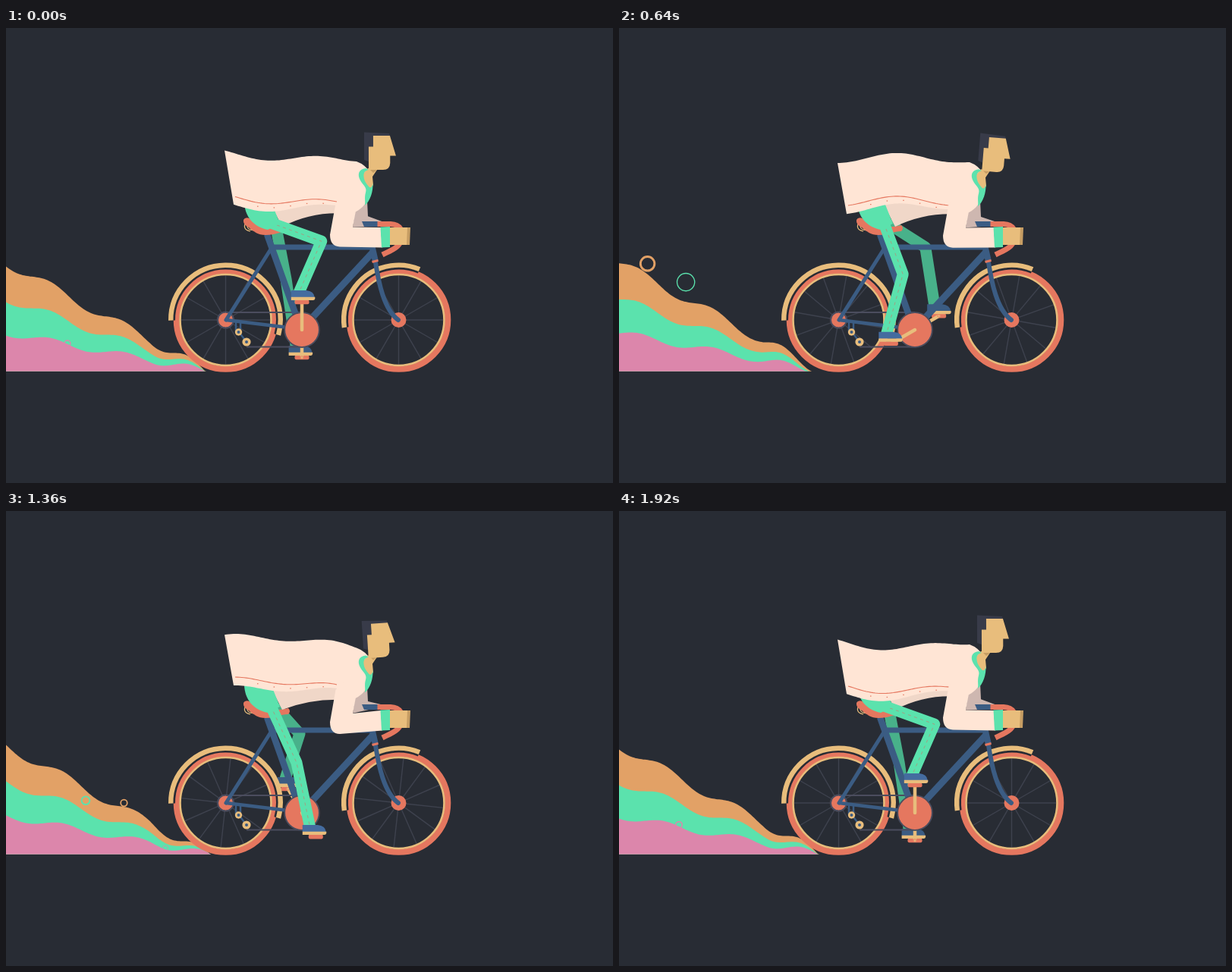
An HTML page with a canvas that plays this animation: 800 by 600 pixels, repeating every 1.96 s.

```html
<!DOCTYPE html>
<html lang="en">
<head>
<meta charset="utf-8">
<title>Cyclist</title>
<style>
html, body { margin: 0; width: 100%; height: 100%; overflow: hidden; background: #282c34; }
canvas { display: block; width: 800px; height: 600px; }
</style>
</head>
<body>
<canvas id="stage" width="800" height="600"></canvas>
<script>
const ctx = document.getElementById('stage').getContext('2d');
const TAU = Math.PI * 2, RAD = Math.PI / 180;
const LOOP = 1960, STEP = 40, TURN = 960, BEAT = 480, CYCLE = 1920;
const C = {
  bg: '#282c34', red: '#e5775f', gold: '#e8bd7c', goldDark: '#c69d63',
  blue: '#3b5c83', shoe: '#446c9f', green: '#5be2ad', greenDark: '#48b18a',
  orange: '#e2a166', pink: '#dc86ab', shirt: '#ffe5d5', lining: '#f0d7c8',
  sleeve: '#ceb7b0', hair: '#383b49', chain: '#4b4d5e', spoke: '#3e424e'
};
const REAR = 289.5, FRONT = 517.5, AXLE = 385, FLOOR = 452.7;
const CRANK = { x: 390, y: 398, len: 36.5 };

function fill(d, color) {
  ctx.fillStyle = color;
  ctx.fill(new Path2D(d));
}
function stroke(d, color, width, cap = 'butt', dash = []) {
  ctx.strokeStyle = color;
  ctx.lineWidth = width;
  ctx.lineCap = cap;
  ctx.lineJoin = 'round';
  ctx.setLineDash(dash);
  ctx.stroke(new Path2D(d));
  ctx.setLineDash([]);
}
function disc(x, y, r, color) {
  ctx.fillStyle = color;
  ctx.beginPath();
  ctx.arc(x, y, r, 0, TAU);
  ctx.fill();
}
function ring(x, y, r, color, width, from = 0, to = TAU) {
  ctx.strokeStyle = color;
  ctx.lineWidth = width;
  ctx.lineCap = 'butt';
  ctx.beginPath();
  ctx.arc(x, y, r, from, to);
  ctx.stroke();
}
function trace(f, from, to, step) {
  const pts = [];
  const n = Math.round(Math.abs(to - from) / step);
  for (let i = 0; i <= n; i++) {
    const x = from + (to - from) * i / n;
    pts.push(x.toFixed(1) + ',' + f(x).toFixed(2));
  }
  return pts.join(' L');
}

// ---- trailing waves ----
const LAYERS = [
  { color: C.orange, y: 309.3, slope: 0.54, amp: 6.5 },
  { color: C.green, y: 357.2, slope: 0.36, amp: 5.5 },
  { color: C.pink, y: 402, slope: 0.19, amp: 4.5 }
];
function waves(t) {
  const start = 180 - 97 * (t % BEAT) / BEAT;
  let above = () => 0;
  for (const { color, y, slope, amp } of LAYERS) {
    const over = above;
    const edge = x => {
      const warped = x + Math.max(0, x - 190) * 0.25;
      const s = Math.sin(TAU * (warped - start) / 97);
      return Math.min(FLOOR, Math.max(over(x), y + slope * x + amp * s));
    };
    fill(`M0,${FLOOR} L${trace(edge, 0, 290, 2)} L290,${FLOOR} Z`, color);
    above = edge;
  }
}

// start, life, x, y, r at birth, their speeds per ms, widest line
const BUBBLES = [
  [C.orange, 150, 850, 59, 350, 0.1, -0.0437, -0.08, 0.0187, 3],
  [C.orange, 950, 900, 168.8, 409.6, 0.7, -0.0325, -0.06, 0.00875, 1.8],
  [C.green, 120, 600, 111, 397, 3.5, -0.044, -0.119, 0.0156, 3.3],
  [C.green, 1240, 600, 110.3, 396, 3.5, -0.044, -0.119, 0.0156, 3.3],
  [C.pink, -200, 740, 91, 426.6, 2.6, -0.05, -0.053, 0.0068, 1.8],
  [C.pink, 1680, 740, 91, 426.6, 2.6, -0.05, -0.053, 0.0068, 1.8],
  [C.pink, 1300, 560, 213, 448, 3.2, -0.05, -0.053, 0.0068, 1.9]
];
function bubbles(t) {
  for (const [color, start, life, x, y, r, vx, vy, vr, w] of BUBBLES) {
    const age = t - start;
    if (age <= 0 || age >= life) continue;
    ring(x + vx * age, y + vy * age, r + vr * age, color, w * Math.sin(Math.PI * age / life));
  }
}

// ---- bicycle ----
function wheel(x, t) {
  const turn = 390 * RAD * t / CYCLE;
  for (let i = 0; i < 12; i++) {
    const a = turn + i * TAU / 12, c = Math.cos(a), s = Math.sin(a);
    stroke(`M${x + 9 * c},${AXLE + 9 * s} L${x + 59 * c},${AXLE + 59 * s}`, C.spoke, 1.4);
  }
  ring(x, AXLE, 64.8, C.red, 8);
  ring(x, AXLE, 60, C.gold, 2.6);
  disc(x, AXLE, 10, C.red);
}
function fender(x, from, to) {
  ring(x, AXLE, 67.9, C.bg, 2.8, from * RAD, to * RAD);
  ring(x, AXLE, 72.3, C.gold, 6.4, from * RAD, to * RAD);
}
function drivetrain() {
  ring(REAR, AXLE, 10.5, C.chain, 2);
  stroke('M290,375 H390 M317,420.5 H392', C.chain, 2);
  stroke('M303,387 V400 M309,389 V398 M307,401 L317,414', C.blue, 2.5);
  for (const [x, y, r] of [[306.5, 401, 4.7], [317, 414, 5.6]]) {
    disc(x, y, r, C.gold);
    disc(x, y, 2, C.blue);
  }
}
function frame() {
  stroke('M350,290 L290,385', C.blue, 5, 'round');
  stroke('M290,385 L372,395', C.blue, 4.5, 'round');
  stroke('M344,272 L384,384', C.blue, 8.5);
  stroke('M350,289 H484', C.blue, 7);
  stroke('M485,294 L398,388', C.blue, 9);
  stroke('M482,286 L487,308', C.blue, 8);
  stroke('M486.5,306 C491,336 498,371 517,385', C.blue, 6, 'round');
  stroke('M482.5,308.5 L490.5,306.5', C.red, 3);
}
function saddle() {
  stroke('M316,256 Q311,266 322,268 M319,257 Q315,266 327,267 M323,259 Q319,266 331,268', C.gold, 1.2);
  fill('M313,253 Q315,249 321,251 C327,257 335,261 345,262 C355,263 364,262 372,260 Q376,264 372,268 C362,268 356,273 342,273 C332,273 326,268 320,263 Q312,259 313,253 Z', C.red);
}
function handlebar() {
  stroke('M489,258.5 H507 C520,259 524,268 521,279 C518,290 508,293 496,299', C.red, 7);
  fill('M469,255 H489.5 V262 H472 Z', C.blue);
}

// ---- legs ----
function pose(a, far) {
  const px = CRANK.x + CRANK.len * Math.sin(a);
  const py = CRANK.y - CRANK.len * Math.cos(a);
  const heel = px - 15.8 + 1.7 * Math.cos(a + 20 * RAD);
  const kneeX = 395 + 24 * Math.cos(a - 30 * RAD);
  const kneeY = 308.5 - 28 * Math.cos(a - 12 * RAD) - 3 * Math.sin(2 * a);
  return {
    px, py, heel,
    hip: far ? [355, 258] : [349, 257],
    knee: far
      ? [kneeX - 12 - 8 * Math.cos(a + 30 * RAD), kneeY + 4 * Math.cos(a)]
      : [kneeX, kneeY],
    ankle: [heel + 10, py - 12]
  };
}
function leg(p, far) {
  const [kx, ky] = p.knee, [ax, ay] = p.ankle;
  const line = `M${p.hip} L${kx},${ky} L${ax},${ay}`;
  ctx.fillStyle = C.red;
  ctx.beginPath();
  ctx.roundRect(p.px - 9.5, p.py - 3, 19, 5.8, 2);
  ctx.fill();
  stroke(line, far ? C.greenDark : C.green, 15);
  if (!far) stroke(line, '#a0a083', 1, 'butt', [4, 4.5]);
  const x = p.heel, y = p.py - 15.5;
  fill(`M${x},${y} H${x + 20} Q${x + 30},${y + 1} ${x + 31},${y + 9} H${x} Z`, far ? C.blue : C.shoe);
  fill(`M${x},${y + 8.7} H${x + 31.5} V${y + 11} Q${x + 31},${y + 13} ${x + 29},${y + 13} H${x} Z`, C.gold);
}
function crankArm(p) {
  stroke(`M${CRANK.x},${CRANK.y} L${p.px},${p.py}`, C.gold, 4.5, 'round');
}

// ---- rider ----
// shirt-back sway: time, height at the tail, height at the middle
const SWAY = [
  [0, 168.1, 173.4], [280, 174.1, 169.8], [440, 173.4, 173.1], [840, 174.4, 171.9],
  [1160, 168.4, 167], [1560, 166.6, 162.2], [1920, 176.1, 181.2]
];
function sway(t) {
  let i = 0;
  while (i < SWAY.length - 2 && t > SWAY[i + 1][0]) i++;
  const a = SWAY[i], b = SWAY[i + 1], k = (t - a[0]) / (b[0] - a[0]);
  return [a[1] + (b[1] - a[1]) * k, a[2] + (b[2] - a[2]) * k];
}
function shirtTop(t, drop) {
  const [tail, mid] = sway(t);
  const length = 155;
  const dip = 344 - length * (t % BEAT) / BEAT;
  return x => {
    const u = (x - 288) / 174;
    const base = tail * (1 - u) * (1 - 2 * u) + 4 * mid * u * (1 - u) + 178.8 * u * (2 * u - 1);
    return drop + base + 6 * (1 - u ** 4) * Math.cos(TAU * (x - dip) / length);
  };
}
function backArm(b) {
  fill(`M470,${226 + b} L476,${230 + b} L477,${250 + b * 0.6} L498,256 L495,262 H478 L457,${265 + b} L460,${244 + b} Z`, C.sleeve);
}
function torso(t, b) {
  const top = shirtTop(t, b);
  const hem = x => top(x) + 68 - 6 * ((x - 300) / 136) ** 2;
  fill(`M288,${top(288)} L${trace(top, 288, 462, 3)} Q474,${183 + b} 481,${195 + b}
    C485,${214 + b} 479,${236 + b} 461,${245 + b} L436,${246 + b} L${trace(hem, 436, 300, 3)} Z`, C.shirt);
  stroke(`M${trace(x => top(x) + 57, 302, 436, 3)}`, C.red, 1.1);
  ctx.fillStyle = C.red;
  for (let x = 331; x < 420; x += 21.6) ctx.fillRect(x, top(x) + 61.5, 1.5, 1.2);
}
function arm(b, e) {
  fill(`M434.5,${234 + b} L427,${276 + e} Q427,${291.5 + e} 440,${291.8 + e} L496,289.5 L494,263
    L457,${265.2 + 0.8 * e} L461,${244 + b} L470,${232 + b} L455,${215 + b} Z`, C.shirt);
  fill('M493.5,262.5 L506,262 V289 L495,289.5 Z', C.green);
  fill('M506,263 H530 L529,286 H506 Z', C.gold);
  fill('M529,263 H533 L532,286 H528 Z', C.goldDark);
}
function collar(e) {
  ctx.save();
  ctx.translate(0, e + 3.3);
  fill('M477,185 L489,187 L483,196 L484,207 L480,214 L473,205 L470,193 Z', C.gold);
  fill('M479,186 L489,187 L484,191 Z', C.goldDark);
  fill('M474,185 C464,186 463,194 467,201 C471,208 476,210 474,217 C472,224 474,229 473,234 C480,228 484,216 483.5,204 C483,210 480,212 478,209 C475,205 472,202 471.5,196 C471,191 473,188 478,187 Z', C.green);
  ctx.restore();
}
function head(k, t) {
  const tilt = 0.5 + 4.5 * Math.cos(TAU * (t - 130) / BEAT);
  ctx.save();
  ctx.translate(480, 190 + 7 * k + 4.2);
  ctx.rotate(tilt * RAD);
  ctx.translate(-480, -190);
  fill('M472,137.5 L505,139 L506.5,143 H484 V157 H478 V176 L472,174 Z', C.hair);
  fill('M484,142 H506 L514,168.5 H506.3 V178 Q506,187 497,187 H478 V156.5 H484 Z', C.gold);
  ctx.restore();
}

function draw(t) {
  const k = -Math.cos(TAU * (t - 70) / BEAT);
  const b = 4.5 * k, e = 5.6 * k;
  const a = TAU * t / TURN;
  const near = pose(a, false), far = pose(a + Math.PI, true);

  ctx.fillStyle = C.bg;
  ctx.fillRect(0, 0, 800, 600);
  waves(t);
  bubbles(t);

  leg(far, true);
  wheel(REAR, t);
  wheel(FRONT, t);
  fender(REAR, 179.5, 376);
  fender(FRONT, 172, 292.4);
  crankArm(far);
  ring(far.px, far.py, 1.8, C.red, 0.8);
  drivetrain();
  backArm(b);
  frame();
  disc(CRANK.x, CRANK.y, 22.5, C.red);
  ring(CRANK.x, CRANK.y, 22.8, C.chain, 1.8);
  crankArm(near);
  saddle();
  handlebar();

  fill(`M338,212 L364,262 Q398,${247 + b} 436,${247 + b} V205 Z`, C.lining);
  leg(near, false);
  fill('M314,230 C315,248 325,262 345,266 L361,258 L345,218 Z', C.green);
  torso(t, b);
  arm(b, e);
  collar(e);
  head(k, t);
}

function tick() {
  const t = performance.now() % LOOP;
  draw(Math.floor(t / STEP) * STEP);
  requestAnimationFrame(tick);
}
tick();
</script>
</body>
</html>
```
